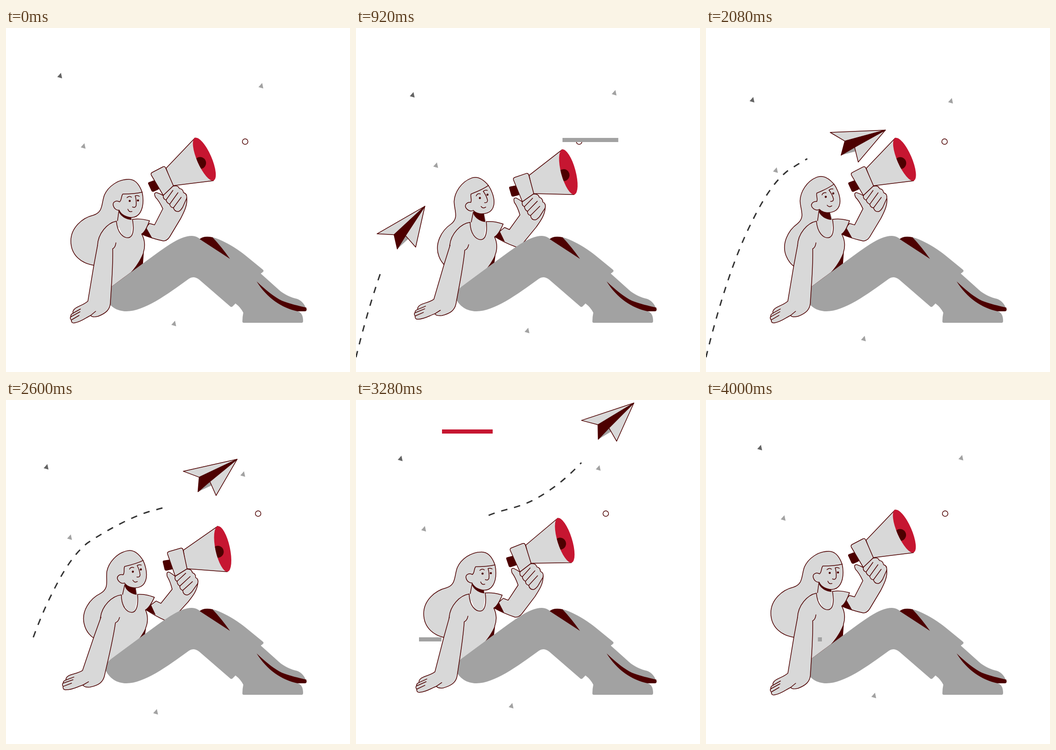
An HTML page for the animation above (4080 ms loop, 748 by 748 pixels).

```html
<!DOCTYPE html>
<html lang="en">
<head>
<meta charset="utf-8">
<title>Announcement</title>
<style>
  html, body { margin: 0; width: 100%; height: 100%; overflow: hidden; background: #fff; }
  svg { display: block; width: 100%; height: 100%; }
  .skin { fill: #d8d8d8; }
  .line { stroke: #4d0000; stroke-width: 1.5; stroke-linecap: round; stroke-linejoin: round; }
  .none { fill: none; }
  .dark { fill: #4d0000; }
  .gray { fill: #a2a2a2; }
  .coal { fill: #646464; }
  .red { fill: #c61631; }
</style>
</head>
<body>
<svg viewBox="0 0 748 748">
  <defs>
    <ellipse id="bell" cx="431.3" cy="285.2" rx="15.8" ry="50.6" transform="rotate(-23.6 431.3 285.2)"/>
    <clipPath id="mouth"><use href="#bell"/></clipPath>
  </defs>

  <path id="trail" fill="none" stroke="#333" stroke-width="3" d="M0,716 C26,610 60,500 98,425 C122,376 145,337 177,311
    C225,279 275,254 310,243 C345,233 375,229 424,194 C475,160 540,85 578,25"/>
  <g id="plane">
    <path class="skin line" d="M0,0 L-104,60 L-67,62 Z"/>
    <path class="gray" d="M-60,93 L-42,64 L-36,71 Z"/>
    <path class="dark line" d="M0,0 L-67,62 L-60,93 L-42,64 Z"/>
    <path class="skin line" d="M0,0 L-42,64 L-20,89 Z"/>
  </g>

  <g id="horn">
    <path class="skin line" d="M312,425 L323,428 L341,393 Q333,376 325,368 Q320,357 328,358 Q337,361 345,366 L364,343
      L393,368 C395,385 388,398 380,414 L356,454 Q350,463 342,463 C328,460 312,456 292,447 Z"/>
    <path class="dark line" d="M311,336 L322,332 Q324,331 325,333 L332,347 Q333,350 330,351 L321,355 Q318,356 317,354 L310,339 Q309,337 311,336 Z"/>
    <path class="skin line" d="M348,305 L411,239 L451,332 L362,343 Z"/>
    <use href="#bell" class="red"/>
    <circle class="dark" cx="422" cy="293.500" r="13" clip-path="url(#mouth)"/>
    <path class="skin line" d="M318,314 L341,302 Q345,300 347,304 L364,343 L342,364 L316,320 Q314,316 318,314 Z"/>
    <path class="skin line" d="M363,344 Q374,341 377,349 Q385,350 386,358 Q394,360 393,370 L384,390 Q379,398 375,399
      Q367,400 364,391 Q357,390 356,383 Q350,381 348,374 Q341,372 342,364 Z"/>
    <path class="none line" d="M363,353 L348,374 M374,358 L356,383 M381,368 L364,391"/>
  </g>

  <path id="hair" class="skin line" d="M296,357 C290,340 280,329 267,329 C243,329 222,345 214,363 C207,382 212,400 190,407
    C165,413 141,435 141,463 C141,495 165,512 191,516"/>

  <g id="body">
    <path class="dark" d="M305,434 L294,448 L318,457 Z"/>
    <path class="skin" d="M246,396 L240,420 L255,455 L272,455 L276,417 L268,396 Z"/>
    <path class="none line" d="M245.500,397 L242.500,419"/>
    <path class="dark" d="M246,396 L268,396 L273,417 C262,417 250,410 246,401 Z"/>
    <path class="skin line" d="M199,473 C200,447 220,424 240,420 C242,445 255,457 266,456 C276,455 279,440 275,416
      C290,414 300,416 312,419 C308,430 303,443 295,448 C302,460 303,475 299,487 L297,513 L262,539 L231,562 L215,580 L205,540 Z"/>
    <path class="dark" d="M299,487 C291,508 278,526 262,541 L297,515 Z"/>
  </g>

  <g id="head">
    <path class="skin line" d="M247,378 C240,374 232,378 233,385 C235,394 242,397 246,396 C250,406 262,412 273,412
      C290,412 298,395 298,375 C298,367 297,361 296,357 C284,360 270,361 254,361 C250,366 252,374 247,378 Z"/>
    <path class="none line" d="M263,369 Q268,364 273,368 M290,366 Q286,363 281,365 Q284,375 283,386 Q281,392 275,389 M265,394 Q267,401 274,399"/>
    <circle class="dark" cx="269" cy="376" r="2.300"/>
    <circle class="dark" cx="287" cy="375" r="2.300"/>
  </g>

  <path class="gray" d="M213,577 L230,562 L295,514 C340,482 375,452 404,452 Q414,452 422,459 L449,455 C470,460 500,478 520,494
    L558,525 Q562,528 558,531 L554,534 L593,569 C605,580 620,586 633,589 C644,593 650,602 654,614 L634,616
    C642,618 646,625 646,637 Q646,641 643,641 L517,641 Q514,641 514,638 Q514,628 516,619 Q510,607 499,599
    L493,605 Q490,608 487,605 L420,547 Q408,538 398,545 C350,580 300,616 262,616 C236,616 219,600 213,577 Z"/>
  <path class="dark" d="M421,459 Q430,451 449,455 Q468,475 487,502 Z"/>
  <path class="dark" d="M545,551 C565,570 582,584 600,593 C618,600 636,604 653,608 Q655,616 650,616 L634,616 C600,609 568,588 545,551 Z"/>

  <g id="arm">
    <path class="skin line" d="M199,473 L191,516 L178,594 C168,603 155,605 149,611 Q144,616 146,620 Q140,623 141,627
      Q138,631 142,635 Q142,643 150,641 C163,639 172,631 184,625 Q188,630 200,627 C218,620 226,612 227,598 C229,560 233,520 232,480 Q238,477 239,467"/>
    <path class="none line" d="M146,620 L162,611 M141,628 L161,617 M142,635 L159,625 M184,625 L195,616"/>
  </g>

  <g id="extras">
    <circle id="ring" cy="247" r="6" fill="#fff" stroke="#4d0000" stroke-width="1.5"/>
  </g>
</svg>
<script>
const STEP = 40, LOOP = 4080, LAST = 99;
const $ = id => document.getElementById(id);
const set = (el, attrs) => { for (const k in attrs) el.setAttribute(k, attrs[k]); };

function add(tag, attrs) {
  const el = document.createElementNS('http://www.w3.org/2000/svg', tag);
  set(el, attrs);
  return $('extras').appendChild(el);
}

const ramp = (n, a, b) => Math.min(1, Math.max(0, (n - a) / (b - a)));
const ease = (n, a, b) => { const u = ramp(n, a, b); return u * u * (3 - 2 * u); };
const swing = (n, a, peak, b) => ease(n, a, peak) - ease(n, peak, b);

// Smooth motion through a few keys of the form [step, x, y].
function track(n, keys) {
  const last = keys.length - 1;
  let i = 0;
  while (i < last - 1 && n > keys[i + 1][0]) i++;
  const a = keys[i], b = keys[i + 1], span = b[0] - a[0], u = (n - a[0]) / span;
  const slope = (k, c) => {
    const p = keys[Math.max(0, k - 1)], q = keys[Math.min(last, k + 1)];
    return (q[c] - p[c]) / (q[0] - p[0]) * span;
  };
  return [1, 2].map(c => {
    const d = b[c] - a[c], m0 = slope(i, c), m1 = slope(i + 1, c);
    return a[c] + u * (m0 + u * (3 * d - 2 * m0 - m1 + u * (m0 + m1 - 2 * d)));
  });
}

// Round trip: out to p after a third of the loop, q after two thirds, then home.
const wander = (n, p, q) => track(n, [[0, 0, 0], [LAST / 3, ...p], [LAST * 2 / 3, ...q], [LAST, 0, 0]]);
const steep = n => wander(n, [4, 55], [-30, 40]);
const flat = n => wander(n, [5, 22], [-40, 35]);

function triangle(x, y, drift, color) {
  const el = add('path', { d: 'M2.5,-6.5 L5,5.5 L-5.5,2.5 Z', class: color });
  return n => {
    const [dx, dy] = drift(n);
    set(el, { transform: `translate(${x + dx} ${y + dy})` });
  };
}

// A bar grows to the right, then its left end catches up.
function bar(x, y, size, from, time, color) {
  const el = add('rect', { y, height: 9, class: color });
  return n => {
    const head = size * ramp(n, from, from + time);
    const tail = size * ramp(n, from + time, from + 2 * time);
    set(el, { x: x + tail, width: head - tail });
  };
}

const length = $('trail').getTotalLength();

function drawTrail(n) {
  const end = Math.min(length, 10.4 * (n - 3.1));
  const start = Math.max(0, 21.5 * (n - 54.3));
  const dashes = [0, start];
  for (let s = start; s < end; s += 29) dashes.push(Math.min(14, end - s), 15);
  dashes.push(0, 2 * length);
  set($('trail'), { 'stroke-dasharray': dashes.join(' '), visibility: end > start ? 'visible' : 'hidden' });
}

function drawPlane(n) {
  const tip = track(n, [[0, 5, 765], [13, 108, 510], [33, 206, 277], [51, 390, 222], [73, 568, 59], [88, 627, -39], [LAST, 665, -120]]);
  const turn = 27.6 * ease(n, 33, 51) - 16 * ease(n, 51, 73);
  set($('plane'), { transform: `translate(${tip}) rotate(${turn})` });
}

function drawPerson(n) {
  const lean = swing(n, 0, 14, 32) + swing(n, 50, 70, 90);
  const tilt = ease(n, 0, 26) - ease(n, 54, 76);
  const nod = { transform: `translate(${14.5 * lean} ${3.5 * lean}) rotate(${-22 * tilt} 242 394)` };
  set($('head'), nod);
  set($('hair'), nod);
  set($('body'), { transform: `rotate(${6.4 * lean} 204 546)` });
  set($('arm'), { transform: `rotate(${11.8 * lean} 208 519)` });
  set($('horn'), { transform: `rotate(${14.6 * lean} 259 503.5)` });
}

const drawRing = n => set($('ring'), { cx: 520 + wander(n, [-40, 0], [30, 0])[0] });

const parts = [
  drawTrail, drawPlane, drawPerson, drawRing,
  triangle(117, 104, steep, 'coal'),
  triangle(168, 257, steep, 'gray'),
  triangle(554.5, 126, flat, 'gray'),
  triangle(365, 643, flat, 'gray'),
  bar(449, 239, 126, 9, 13.5, 'gray'),
  bar(187, 64, 124, 69, 13.5, 'red'),
  bar(137, 516, 115, 75.9, 12, 'gray')
];

function draw(t) {
  const n = Math.max(0, Math.floor(t / STEP + 0.01) - 1);
  parts.forEach(part => part(n));
}

let begin;
function tick(now) {
  begin ??= now;
  draw((now - begin) % LOOP);
  requestAnimationFrame(tick);
}
draw(0);
requestAnimationFrame(tick);
</script>
</body>
</html>
```
